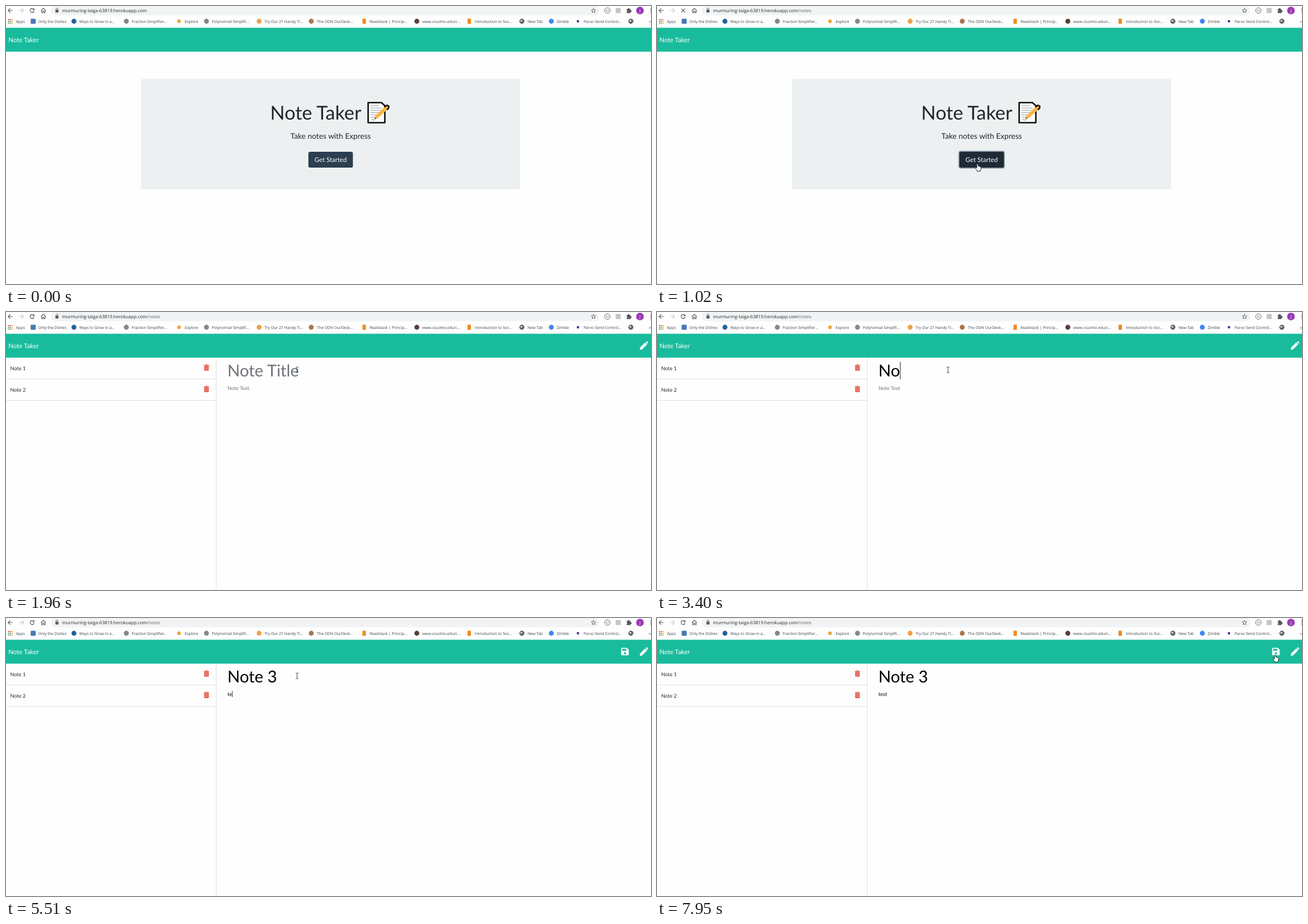
These frames come from a looping animation (1139x492 px, 8 s). An HTML page with a canvas:

```html
<!DOCTYPE html>
<html lang="en">
<head>
<meta charset="utf-8">
<title>Note Taker</title>
<style>
html, body { margin: 0; width: 100%; height: 100%; overflow: hidden; background: #fefefe; }
canvas { display: block; width: 1139px; height: 492px; }
</style>
</head>
<body>
<canvas id="stage"></canvas>
<script>
const W = 1139, H = 492, LOOP = 8000;
const canvas = document.getElementById('stage');
const ratio = window.devicePixelRatio || 1;
canvas.width = W * ratio;
canvas.height = H * ratio;
const c = canvas.getContext('2d');
c.scale(ratio, ratio);
if ('textRendering' in c) c.textRendering = 'geometricPrecision';

const LATO = 'Lato, sans-serif';
const UI = '"Open Sans", "Noto Sans", sans-serif';
const TITLE_SIZE = 28.95, BODY_SIZE = 9.05;

// ---- drawing helpers ----
function text(str, x, y, size, color, font = LATO, align = 'left') {
  c.font = size + 'px ' + font;
  c.fillStyle = color;
  c.textAlign = align;
  c.fillText(str, x, y);
}

function textWidth(str, size) {
  c.font = size + 'px ' + LATO;
  return c.measureText(str).width;
}

function rect(x, y, w, h, color) {
  c.fillStyle = color;
  c.fillRect(x, y, w, h);
}

function round(x, y, w, h, r, color) {
  c.fillStyle = color;
  c.beginPath();
  c.roundRect(x, y, w, h, r);
  c.fill();
}

function dot(x, y, r, color) {
  c.fillStyle = color;
  c.beginPath();
  c.arc(x, y, r, 0, Math.PI * 2);
  c.fill();
}

function shape(d, x, y, fill, stroke, width = 1) {
  const path = new Path2D(d);
  c.save();
  c.translate(x, y);
  c.lineJoin = 'round';
  if (fill) { c.fillStyle = fill; c.fill(path); }
  if (stroke) { c.strokeStyle = stroke; c.lineWidth = width; c.stroke(path); }
  c.restore();
}

// ---- browser bars ----
const bookmarks = [
  ['square', 48, '#4a78b5', 57, 'Only the Dishes'],
  ['circle', 120, '#24629c', 129.5, 'Ways to Grow in a...'],
  ['circle', 212.5, '#85878b', 222, 'Fraction Simplifier...'],
  ['small', 305.5, '#f0a338', 315.5, 'Explore'],
  ['circle', 354, '#85878b', 363.5, 'Polynomial Simplifi...'],
  ['circle', 447, '#f0a04b', 456.5, 'Try Our 27 Handy Ti...'],
  ['circle', 539, '#a8764f', 549, 'The ODN OurDesk...'],
  ['tall', 632.5, '#f08a1d', 642, 'Readstack | Princip...'],
  ['circle', 725.5, '#574039', 735, 'www.csuohio.edu/c...'],
  ['tall', 818, '#f08a1d', 828, 'Introduction to Soc...'],
  ['globe', 911, '#55585c', 921, 'New Tab'],
  ['circle', 963, '#4285f4', 972.5, 'Zimble'],
  ['flat', 1010, '#5a3a92', 1020, 'Parvo Send Control...'],
  ['globe', 1103.5, '#55585c', 0, '']
];

function bookmarkIcon(kind, x, color) {
  if (kind === 'square') round(x - 4.5, 22.5, 9, 9, 1.5, color);
  else if (kind === 'tall') rect(x - 3, 22.5, 6, 9, color);
  else if (kind === 'flat') rect(x - 2, 25, 4, 4, color);
  else dot(x, 27, kind === 'small' ? 3.2 : 4.4, color);
  if (kind === 'globe') {
    shape('M-2.8-1.8L0-2.6L1.2-1L-.8.2L-1.2 2Z M1.2 1L3 .4L2 2.6Z', x, 27, '#f4f4f4');
  }
}

function drawBrowser(url, loading) {
  const ink = '#55585c';
  rect(0, 0, W, 38.5, '#fefefe');
  round(79, -.5, 968.5, 17, 8.5, '#f1f3f4');

  shape('M4 0H-4M-.2-3.8L-4 0L-.2 3.8', 7.8, 8, null, ink, 1.15);
  shape('M-4 0H4M.2-3.8L4 0L.2 3.8', 27, 8, null, '#c4c6c8', 1.15);
  if (loading) {
    shape('M-3.3-3.3L3.3 3.3M3.3-3.3L-3.3 3.3', 46.3, 8, null, ink, 1.15);
  } else {
    c.strokeStyle = ink;
    c.lineWidth = 1.15;
    c.beginPath();
    c.arc(46.2, 8, 3.5, .3, 5.5);
    c.stroke();
    shape('M4-4.3V-.6H.4Z', 46.2, 8, ink);
  }
  shape('M-4.4.2L0-4L4.4.2M-3.1-.5V4H-1V1H1V4H3.1V-.5', 66, 8, null, ink, 1.1);

  round(87.3, 6.6, 5.4, 4.8, .6, ink);
  shape('M-1.6 0V-1.5A1.6 1.6 0 0 1 1.6-1.5V0', 90, 6.8, null, ink, .9);
  const host = 'murmuring-taiga-63819.herokuapp.com';
  text(host, 99, 11, 8, '#26282b', UI);
  if (url) text(url, 99 + c.measureText(host).width, 11, 8, '#62666a', UI);

  shape('M0-4L1.1-1.2L4-1L1.8.9L2.5 3.8L0 2.2L-2.5 3.8L-1.8.9L-4-1L-1.1-1.2Z', 1037.5, 8, null, ink, .9);
  c.strokeStyle = ink;
  c.lineWidth = .9;
  c.beginPath();
  c.arc(1062, 8, 4.9, 0, Math.PI * 2);
  c.stroke();
  shape('M-1-2Q-2.6 0-1 2M1-2Q2.6 0 1 2', 1062, 8, null, ink, .8);
  round(1076.5, 3.5, 9, 9, 1, '#c3c4c6');
  round(1096, 5.5, 7, 7, .8, ink);
  dot(1099.5, 5.2, 1.6, ink);
  dot(1103.3, 9, 1.6, ink);
  dot(1096.2, 9, 1.1, '#fefefe');
  dot(1119.5, 8, 6.8, '#9b3bb5');
  text('J', 1119.5, 10.6, 7.2, '#fff', UI, 'center');
  for (const y of [5, 8, 11]) dot(1138.4, y, .8, ink);

  const grid = ['#e0503f', '#e0503f', '#eda92a', '#43a35a', '#4a83d8', '#eda92a', '#43a35a', '#43a35a', '#eda92a'];
  grid.forEach((color, i) => rect(3.5 + i % 3 * 3.1, 23 + Math.floor(i / 3) * 3.1, 2, 2, color));
  text('Apps', 17.5, 29.6, 6.8, '#3c4043', UI);
  for (const [kind, x, color, labelX, label] of bookmarks) {
    bookmarkIcon(kind, x, color);
    text(label, labelX, 29.6, 6.8, '#3c4043', UI);
  }
  text('»', 1135, 29.6, 7.5, ink, UI);
}

// ---- pages ----
function drawHeader() {
  rect(0, 38.5, W, 42.3, '#18bc9c');
  text('Note Taker', 4.3, 64, 11.3, '#fff');
}

function drawMemo() {
  shape('M1.5 1.5H25L31 7V37H1.5Z', 638, 169.5, '#fdfdfd', '#0c0c0c', 2.6);
  for (let i = 0; i < 6; i++) {
    rect(643.5, 176 + i * 4, i === 0 ? 15 : [20, 21, 19, 15, 12][i - 1], 1.2, '#a9abad');
  }
  shape('M0 2Q2-1 3 1T7 0', 645, 200.5, null, '#55585c', .8);
  shape('M0 0L25-23', 652, 199, null, '#0c0c0c', 0);
  shape('M0 0L1.2-5L19.5-23Q22-25.2 24.3-22.8Q26-20.5 24-18.4L5-1.6Z', 651, 200, '#f8b63c', '#f8b63c', .5);
  shape('M17.4-21L20-23.6Q22.2-25.2 24.3-23Q26-20.7 24-18.4L21.6-16.2', 651, 200, '#f5a02c', '#0c0c0c', 2.4);
  shape('M0 0L.8-3L3-.8Z', 651, 200, '#3c3c3c');
}

function drawHome(hover, focus) {
  round(238.5, 129, 669.5, 195.2, 3, '#ecf0f1');
  text('Note Taker', 466.6, 200.6, 33.8, '#212529');
  drawMemo();
  text('Take notes with Express', 573.4, 235.3, 13.57, '#212529', LATO, 'center');
  if (focus) round(532.3, 256.3, 81.8, 31.4, 4, '#8a98a5');
  round(534, 258, 78.6, 28, 3, hover ? '#1e2b37' : '#2c3e50');
  text('Get Started', 573.3, 276, 11.3, '#fff', LATO, 'center');
}

function drawTrash(x, y) {
  const red = '#e74c3c';
  rect(x - 4.8, y - 4.3, 9.6, 1.3, red);
  rect(x - 1.6, y - 5.4, 3.2, 1.4, red);
  round(x - 4.1, y - 2.4, 8.2, 8, 1, red);
  for (const dx of [-2.2, 0, 2.2]) rect(x + dx - .35, y - 1.1, .7, 5.4, '#f8d5d1');
}

function drawPencil() {
  shape('M-7.3 7.4L-6.7 3.2L2.4-5.8L5.8-2.4L-3.2 6.7Z M3.3-6.6L4.3-7.4Q5.2-7.9 6-7.2L7.2-6Q7.9-5.2 7.4-4.3L6.6-3.3Z', 1126.5, 59.5, '#fff');
}

function drawSave() {
  shape('M-6.6-5.4Q-6.6-6.6-5.4-6.6H3.4L6.6-3.4V5.4Q6.6 6.6 5.4 6.6H-5.4Q-6.6 6.6-6.6 5.4Z', 1093, 59.3, '#fff');
  rect(1088.2, 54.6, 7.2, 3.3, '#18bc9c');
  dot(1093, 62.4, 1.9, '#18bc9c');
}

const titleKeys = [3230, 3400, 3570, 3650, 3880, 4410];
const bodyKeys = [5360, 5510, 5750, 5900];
const titleCaret = [[2120, 2600], [3160, 4640]];
const bodyCaret = [[4640, 5190], [5360, 6450], [7000, 7530]];
const typed = (str, keys, t) => str.slice(0, keys.filter(k => t >= k).length);
const within = (spans, t) => spans.some(([a, b]) => t >= a && t < b);

function drawNotes(t) {
  drawPencil();
  if (t >= 5430) drawSave();
  rect(370.7, 81, 1, H - 81, '#dedfe0');
  if (t >= 1240) {
    [0, 1].forEach(i => {
      const y = 38 * i;
      text('Note ' + (i + 1), 7.4, 103 + y, BODY_SIZE, '#212529');
      drawTrash(354, 98.2 + y);
      rect(0, 118 + y, 371, 1, '#dfe0e0');
    });
  }
  const title = typed('Note 3', titleKeys, t);
  const body = typed('test', bodyKeys, t);
  text(title || 'Note Title', 391, 114.4, TITLE_SIZE, title ? '#000' : '#6f747a');
  text(body || 'Note Text', 391, 137.8, BODY_SIZE, body ? '#000' : '#6f747a');
  if (within(titleCaret, t)) rect(391 + textWidth(title, TITLE_SIZE), 88.3, .9, 30.6, '#111');
  if (within(bodyCaret, t)) rect(391 + textWidth(body, BODY_SIZE), 129, .8, 11, '#111');
}

// ---- pointer ----
const pointers = {
  arrow: 'M0 0V12L2.8 9.5L4.6 13.4L6.4 12.6L4.7 8.8H8.5Z',
  hand: 'M-1.2 1.2Q0-.6 1.2 1.2V4.6Q2.2 3.9 3 5Q4 4.5 4.6 5.6Q6.1 5.3 6.1 7V9.4Q6 11 5 12V13.4H-.7V12.2L-3.6 8.6Q-4.4 7.2-3.2 6.7Q-2.3 6.6-1.2 8Z'
};

function drawPointer({ kind, x, y }) {
  if (kind === 'beam') {
    shape('M-2.3-4.9H-.6L0-4.4L.6-4.9H2.3M0-4.4V4.4M-2.3 4.9H-.6L0 4.4L.6 4.9H2.3', x, y, null, '#3a3a3a', .95);
  } else {
    shape(pointers[kind], x, y, '#fff', '#111', .9);
  }
}

// Progress through evenly spaced jumps, from 0 at a to 1 at b.
function steps(t, a, b, n) {
  const k = Math.floor((t - a) / (b - a) * (n - 1) + 1e-6);
  return Math.max(0, Math.min(1, k / (n - 1)));
}

const lerp = (a, b, p) => a + (b - a) * p;
const smooth = p => p * p * (3 - 2 * p);
const onButton = p => p && p.x > 534 && p.x < 612.6 && p.y > 258 && p.y < 286;

function pointerAt(t) {
  if (t < 70) return null;
  if (t < 1090) {
    const p = steps(t, 70, 690, 9), e = 1 - (1 - p) ** 2;
    const pos = { kind: 'arrow', x: lerp(1011, 566, e), y: lerp(470, 279, e) };
    if (onButton(pos)) pos.kind = 'hand';
    return pos;
  }
  if (t < 1700) {
    const p = smooth(steps(t, 1090, 1630, 8));
    return { kind: p ? 'beam' : 'hand', x: lerp(566, 497, p), y: lerp(279, 102, p) };
  }
  if (t < 7000) {
    const p = (1 + 3 * steps(t, 1700, 1960, 4)) / 4;
    return { kind: 'beam', x: lerp(497, 514, p), y: 102.4 };
  }
  if (t < 7870) {
    const p = smooth(steps(t, 7000, 7790, 11));
    const y = lerp(102.4, 44, p);
    return { kind: y > 81 ? 'beam' : 'arrow', x: lerp(514, 1092, p), y };
  }
  return { kind: 'hand', x: 1091.5, y: t < 7950 ? 55 : 64.7 };
}

// ---- loop ----
function draw(t) {
  const pointer = pointerAt(t);
  rect(0, 0, W, H, '#fefefe');
  drawBrowser(t >= 940 ? '/notes' : '', t >= 940 && t < 1400);
  drawHeader();
  if (t < 1090) drawHome(onButton(pointer), t >= 860);
  else drawNotes(t);
  if (pointer) drawPointer(pointer);
}

const start = performance.now();
function frame() {
  draw((performance.now() - start) % LOOP);
  requestAnimationFrame(frame);
}
frame();
</script>
</body>
</html>
```
